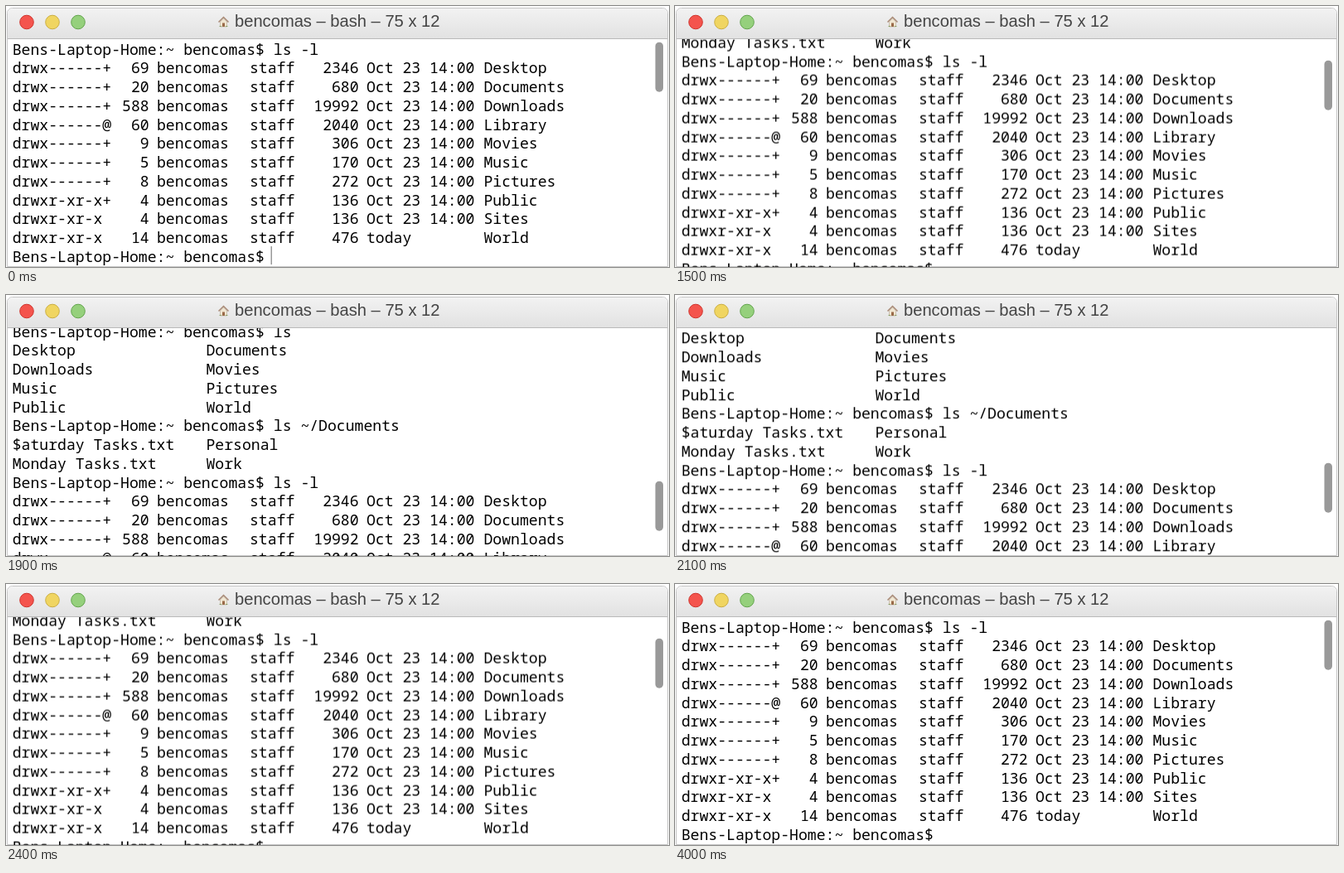
Write an HTML page that moves like this. It is 800 px wide and 315 px high and loops after 4500 ms.

```html
<!DOCTYPE html>
<html lang="en">
<head>
<meta charset="utf-8">
<title>Terminal</title>
<style>
  html, body { margin: 0; width: 100%; height: 100%; overflow: hidden; background: #fff; }
  svg { display: block; width: 800px; height: 315px; }
  .title { font: 20.150px "Liberation Sans", sans-serif; fill: #444; }
  .output { font: 18.120px "Noto Sans Mono", monospace; fill: #000; }
  .right { text-anchor: end; }
  .output, .thumb, .cursor { animation: 4.5s step-end infinite; }
  .output { animation-name: scroll; }
  .thumb { animation-name: thumb; fill: #999; }
  .cursor { animation-name: blink; fill: #999; }

  @keyframes scroll {
    0%, 55.55% { transform: translateY(0); }
    33.33%, 53.33% { transform: translateY(14.6px); }
    35.55%, 51.11% { transform: translateY(58.5px); }
    37.77%, 48.88% { transform: translateY(115.5px); }
    40%, 46.66% { transform: translateY(159.2px); }
    42.22% { transform: translateY(174px); }
  }
  @keyframes thumb {
    0%, 55.55% { transform: translateY(0); }
    33.33%, 53.33% { transform: translateY(22px); }
    35.55%, 51.11% { transform: translateY(58px); }
    37.77%, 48.88% { transform: translateY(123px); }
    40%, 46.66% { transform: translateY(159px); }
    42.22% { transform: translateY(181px); }
  }
  @keyframes blink {
    0%, 22.22%, 55.55%, 77.77% { opacity: 1; }
    11.11%, 33.33%, 66.66%, 88.88% { opacity: 0; }
  }
</style>
</head>
<body>
<svg viewBox="0 0 800 315">
  <defs>
    <linearGradient id="bar" x2="0" y2="1">
      <stop stop-color="#f2f2f2"/>
      <stop offset="1" stop-color="#e2e2e2"/>
    </linearGradient>
    <clipPath id="screen"><rect x="2" y="40.500" width="796" height="275"/></clipPath>
  </defs>

  <path d="M1.500 314.500V8.500a6 6 0 0 1 6-6H792.500a6 6 0 0 1 6 6V314.500Z" fill="#fff" stroke="#c6c6c6"/>
  <path d="M2 39V8.500a5.500 5.500 0 0 1 5.500-5.500H792.500a5.500 5.500 0 0 1 5.500 5.500V39Z" fill="url(#bar)"/>
  <path d="M2 39.500H798" stroke="#b9b9b9"/>

  <circle cx="25" cy="19.500" r="8.300" fill="#f4544d" stroke="#cf332c"/>
  <circle cx="56" cy="19.500" r="8.300" fill="#f0d561" stroke="#cbae42"/>
  <circle cx="87" cy="19.500" r="8.300" fill="#95d07c" stroke="#62a44c"/>

  <g>
    <path d="M258.500 19L262.500 15L266.500 19V25H258.500Z" fill="#f1e7d2" stroke="#b5a894" stroke-width=".6"/>
    <path d="M256.500 19.500L262.500 13.500L268.500 19.500" fill="none" stroke="#a98a76" stroke-width="1.500"/>
    <path d="M261 20.500H264V25H261Z" fill="#9a6b49"/>
    <path d="M257.500 24.500H260M265 24.500H267.500" stroke="#8da36b"/>
  </g>
  <text class="title" x="276" y="24.700">bencomas – bash – 75 x 12</text>

  <g clip-path="url(#screen)">
    <g class="output" id="output">
      <rect class="cursor" x="319.500" y="290" width="1.500" height="22"/>
    </g>
    <rect class="thumb" x="783.500" y="43.700" width="9.500" height="60" rx="4.700"/>
  </g>
</svg>
<script>
  const USER = 'bencomas';
  const PROMPT = `Bens-Laptop-Home:~ ${USER}$`;
  const LEFT = 7.7;
  const LINE = 22.75;
  const FIRST_BASELINE = 58.5;
  const output = document.getElementById('output');

  function put(text, x, row, right) {
    const node = document.createElementNS(output.namespaceURI, 'text');
    node.setAttribute('x', x);
    node.setAttribute('y', FIRST_BASELINE + row * LINE);
    if (right) node.setAttribute('class', 'right');
    node.textContent = text;
    output.append(node);
  }

  function putPair(left, right, row) {
    put(left, LEFT, row);
    put(right, 241.5, row);
  }

  function putEntry([mode, links, size, name, date = 'Oct 23 14:00'], row) {
    put(mode, LEFT, row);
    put(links, 172.7, row, true);
    put(USER, 182, row);
    put('staff', 294, row);
    put(size, 425.6, row, true);
    put(date, 435, row);
    put(name, 576.5, row);
  }

  const entries = [
    ['drwx------+', 69, 2346, 'Desktop'],
    ['drwx------+', 20, 680, 'Documents'],
    ['drwx------+', 588, 19992, 'Downloads'],
    ['drwx------@', 60, 2040, 'Library'],
    ['drwx------+', 9, 306, 'Movies'],
    ['drwx------+', 5, 170, 'Music'],
    ['drwx------+', 8, 272, 'Pictures'],
    ['drwxr-xr-x+', 4, 136, 'Public'],
    ['drwxr-xr-x', 4, 136, 'Sites'],
    ['drwxr-xr-x', 14, 476, 'World', 'today'],
  ];

  // Row 0 is the first line visible before scrolling; history has negative rows.
  put(`${PROMPT} ls`, LEFT, -8);
  putPair('Desktop', 'Documents', -7);
  putPair('Downloads', 'Movies', -6);
  putPair('Music', 'Pictures', -5);
  putPair('Public', 'World', -4);
  put(`${PROMPT} ls ~/Documents`, LEFT, -3);
  putPair('$aturday Tasks.txt', 'Personal', -2);
  putPair('Monday Tasks.txt', 'Work', -1);
  put(`${PROMPT} ls -l`, LEFT, 0);
  entries.forEach((entry, i) => putEntry(entry, i + 1));
  put(PROMPT, LEFT, 11);
</script>
</body>
</html>
```
